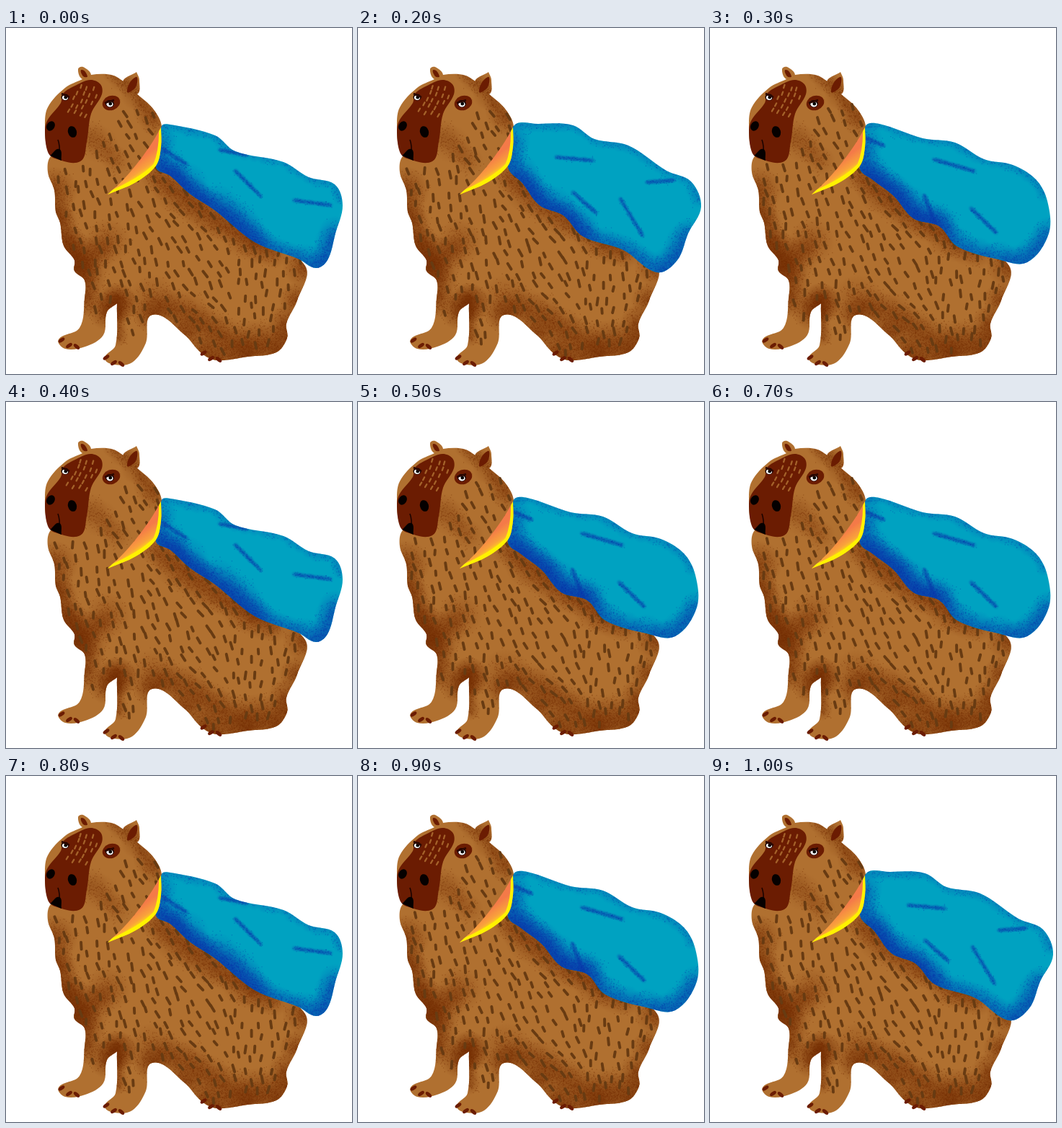
These frames come from a looping animation (480 px wide and 480 px high, 1.1 s). An HTML page with a canvas:

```html
<!DOCTYPE html>
<html lang="en">
<head>
<meta charset="utf-8">
<title>Caped capybara</title>
<style>
html, body { margin: 0; width: 100%; height: 100%; overflow: hidden; background: #fff; }
canvas { display: block; width: 480px; height: 480px; }
</style>
</head>
<body>
<canvas id="stage" width="480" height="480"></canvas>
<script>
const SIZE = 480, STEP = 100;
const BROWN = '#b07030', SHADE = '116,46,3', MASK = '#6b1c02', FUR = '#683b12', BLACK = '#050000';
const TEAL = '#00a2c1', BLUE = '10,56,170', YELLOW = '#fff200';

const points = s => s.split(' ').map(p => p.split(',').map(Number));

function random(seed) {
  return () => {
    seed = (seed + 0x6D2B79F5) | 0;
    let t = Math.imul(seed ^ (seed >>> 15), 1 | seed);
    t = (t + Math.imul(t ^ (t >>> 7), 61 | t)) ^ t;
    return ((t ^ (t >>> 14)) >>> 0) / 4294967296;
  };
}

// Closed smooth curve through key points; a doubled point makes a corner
function blob(text) {
  const pts = points(text), n = pts.length, path = new Path2D();
  const handle = (at, from, to, reach) => {
    const k = reach / (Math.hypot(to[0] - from[0], to[1] - from[1]) || 1);
    return [at[0] + (to[0] - from[0]) * k, at[1] + (to[1] - from[1]) * k];
  };
  path.moveTo(...pts[0]);
  for (let i = 0; i < n; i++) {
    const a = pts[(i + n - 1) % n], b = pts[i], c = pts[(i + 1) % n], d = pts[(i + 2) % n];
    const reach = Math.hypot(c[0] - b[0], c[1] - b[1]) / 3;
    path.bezierCurveTo(...handle(b, a, c, reach), ...handle(c, d, b, reach), ...c);
  }
  return path;
}

function layer(draw) {
  const canvas = document.createElement('canvas');
  canvas.width = canvas.height = SIZE;
  draw(canvas.getContext('2d'));
  return canvas;
}

function oval(g, x, y, rx, ry, turn, color) {
  g.fillStyle = color;
  g.beginPath();
  g.ellipse(x, y, rx, ry, turn, 0, 7);
  g.fill();
}

function dash(g, x, y, angle, length) {
  const dx = Math.sin(angle) * length / 2, dy = Math.cos(angle) * length / 2;
  g.beginPath();
  g.moveTo(x - dx, y - dy);
  g.lineTo(x + dx, y + dy);
  g.stroke();
}

// Soft grainy airbrush spot
function spray(g, x, y, r, rgb, strength, rnd) {
  const soft = g.createRadialGradient(x, y, 0, x, y, r);
  soft.addColorStop(0, `rgba(${rgb},${strength})`);
  soft.addColorStop(0.5, `rgba(${rgb},${strength * 0.45})`);
  soft.addColorStop(1, `rgba(${rgb},0)`);
  g.fillStyle = soft;
  g.fillRect(x - r, y - r, 2 * r, 2 * r);
  g.fillStyle = `rgba(${rgb},0.45)`;
  for (let i = r * r * 0.45 * strength; i > 0; i--) {
    const d = r * 1.15 * Math.sqrt(rnd()) * (0.3 + 0.7 * rnd()), a = rnd() * 6.283;
    g.fillRect(x + d * Math.cos(a), y + d * Math.sin(a), 1.1, 1.1);
  }
}

// Even spray along a chain of points
function sprayLine(g, pts, r, rgb, strength, rnd, gap) {
  for (let i = 1; i < pts.length; i++) {
    const [x, y] = pts[i - 1], dx = pts[i][0] - x, dy = pts[i][1] - y;
    const steps = Math.ceil(Math.hypot(dx, dy) / gap);
    for (let k = 0; k < steps; k++) {
      spray(g, x + dx * k / steps, y + dy * k / steps, r * (0.8 + 0.4 * rnd()), rgb, strength, rnd);
    }
  }
}

const torsoEdge = '216,136 262,195 345,285 415,330 404,378 389,410 390,430 375,450 335,456 292,461 271,451 247,425 203,398 194,437 175,464 150,467 137,458 152,440 154,382 154,382 140,394 135,426 110,442 82,445 73,432 102,416 109,375 109,350 95,337 95,322 80,302 75,270 69,255 67,225 58,200 62,178 120,130';
const torso = blob(torsoEdge);
const head = blob('106,71 118,65 146,65 164,75 181,91 204,112 216,137 208,165 180,200 120,210 72,186 58,170 54,135 58,110 82,83');
const ears = [blob('106,71 100,57 107,54 118,66'), blob('162,76 181,61 181,61 185,72 181,92')];
const body = new Path2D();
[torso, head, ...ears].forEach(p => body.addPath(p));

const mask = blob('98,79 117,72 131,78 133,92 118,119 112,158 103,185 68,181 58,172 54,141 58,127 76,104 79,91');

const bodyLayer = layer(g => {
  const rnd = random(7);
  g.fillStyle = BROWN;
  [...ears, torso, head].forEach(p => g.fill(p));
  g.save();
  g.clip(body);
  const rim = points(torsoEdge).filter(([x, y]) => y > 200 && (y < 410 || x > 200));
  rim.forEach(([x, y]) => spray(g, x, y, 24 + rnd() * 10, SHADE, 0.65, rnd));
  sprayLine(g, points('150,62 182,92 214,140'), 20, SHADE, 0.4, rnd, 16);
  sprayLine(g, points('208,205 290,265 385,318'), 28, SHADE, 0.4, rnd, 18);
  sprayLine(g, points('205,380 255,398 320,445 385,430'), 32, SHADE, 0.38, rnd, 20);
  sprayLine(g, points('84,290 108,330 152,285'), 27, SHADE, 0.4, rnd, 20);
  sprayLine(g, points('118,150 165,195'), 24, SHADE, 0.28, rnd, 18);
  sprayLine(g, points('152,375 156,440'), 16, SHADE, 0.5, rnd, 14);
  g.restore();

  g.fillStyle = MASK;
  g.fill(mask);
  g.fill(blob('180,68 180,82 168,88'));
  g.fill(blob('105,58 113,67 107,67'));
  oval(g, 146, 104, 12.5, 10, -0.35, MASK);

  // Eyes
  for (const [x, y, r] of [[82, 96, 4.5], [144, 105, 5]]) {
    oval(g, x, y, r + 1, r, 0.1, '#160300');
    oval(g, x, y + 0.7, r - 0.4, r - 1.3, 0.1, '#fff');
    oval(g, x + 0.8, y, 2.4, 2.5, 0, '#000');
  }
  g.strokeStyle = '#2b0700';
  g.lineWidth = 2.5;
  g.stroke(new Path2D('M77 91L88 96M137 104L150 100'));

  // Nose and mouth
  oval(g, 62, 136, 5.5, 7, 0.55, BLACK);
  oval(g, 92, 144, 6, 8, -0.3, BLACK);
  g.strokeStyle = '#1c0300';
  g.lineWidth = 1.6;
  g.stroke(new Path2D('M72 155Q75 163 74 174'));
  g.fillStyle = BLACK;
  g.fill(blob('61,177 61,177 74,168 77,184 77,184'));

  for (const [x, y] of points('77,433 139,457 274,451')) {
    for (let i = 0; i < 3; i++) {
      oval(g, x + i * 10.5, y + 4.5 * i + (i === 1 ? 3 : 0), 5, 2.5, i === 2 ? 0.7 : -0.6, MASK);
    }
  }
});

function furLayer(seed, shift) {
  return layer(g => {
    const rnd = random(seed);
    const jitter = size => (rnd() - 0.5) * size;
    const near = (x, y, cx, cy, spread) => Math.exp(-((x - cx) ** 2 + (y - cy) ** 2) / spread);
    const inside = (x, y) => g.isPointInPath(body, x, y);
    g.lineCap = 'round';
    g.strokeStyle = FUR;
    g.lineWidth = 3.9;
    for (let row = 0, top = 116 + shift; top < 456; top += 16, row++) {
      for (let left = 58 + (row % 2) * 9 + shift; left < 412; left += 18) {
        const x = left + jitter(9), y = top + jitter(10);
        // Hair leans back along the spine and belly, stands upright on the rump
        const lean = 0.15 + 0.5 * near(x, y, 255, 255, 6500) + 0.6 * near(x, y, 270, 395, 2200)
          + (y < 200 && x > 140 ? 0.3 : 0) - (x > 310 && y > 310 ? 0.2 : 0) + jitter(0.5);
        const length = 6 + rnd() * 4;
        const face = y < 188 && x < 152 - (y - 125) * 0.6;
        const foot = (x < 146 && y > 405) || (x < 212 && y > 436);
        if (!face && !foot && inside(x - 6, y - 5) && inside(x + 6, y + 7) && inside(x - 4, y + 6)) {
          dash(g, x, y, lean, length);
        }
      }
    }
    // Light hairs on the forehead
    g.strokeStyle = '#a4622a';
    g.lineWidth = 2.3;
    for (let i = 0; i < 20; i++) {
      const row = i >> 2, col = i % 4;
      const x = 104 - row * 4.5 + col * 8.5 + jitter(3), y = 81 + row * 8.5 + col * 2 + jitter(3);
      if (g.isPointInPath(mask, x - 4, y) && g.isPointInPath(mask, x + 4, y + 3)) {
        dash(g, x, y, -0.3 - row * 0.06, 4.5);
      }
    }
  });
}

// Each pose: upper rim, lower rim back to the neck, folds
const capes = {
  A: {
    top: '216,136 228,134 290,149 318,171 385,186 420,207 456,217 467,246',
    low: '457,285 446,322 430,333 405,320 345,297 290,253 255,230 228,205 208,193',
    folds: ['218,168 252,190', '296,169 335,176', '318,198 355,235', '400,239 452,246']
  },
  B: {
    top: '216,136 250,133 298,135 328,154 375,163 428,198 462,213 476,248',
    low: '458,285 443,322 415,339 368,308 312,289 285,260 252,246 228,215 208,193',
    folds: ['275,179 328,184', '364,237 396,290', '298,228 332,258', '400,214 440,211']
  },
  C: {
    top: '216,136 235,133 295,153 340,159 380,182 420,190 452,210 468,240',
    low: '470,285 440,325 400,321 343,303 318,275 282,264 255,233 225,210 208,195',
    folds: ['310,182 368,199', '362,250 398,285', '297,232 313,272', '215,152 243,164']
  }
};

const collar = blob('215,138 215,138 215,165 208,191 180,214 141,231 141,231 164,209 185,184 204,157');

function capeLayer({ top, low, folds }, seed) {
  return layer(g => {
    const rnd = random(seed), shape = blob(`${top} ${low}`);
    const lower = points(low), neck = lower.slice(-5);
    g.fillStyle = TEAL;
    g.fill(shape);
    g.save();
    g.clip(shape);
    sprayLine(g, lower, 23, BLUE, 0.38, rnd, 15);
    sprayLine(g, neck, 32, BLUE, 0.42, rnd, 18);
    sprayLine(g, points('208,190 216,140'), 24, BLUE, 0.4, rnd, 18);
    sprayLine(g, points(top), 11, BLUE, 0.25, rnd, 14);
    folds.forEach(f => sprayLine(g, points(f), 4.5, BLUE, 0.32, rnd, 2));
    g.restore();

    const warm = g.createLinearGradient(178, 186, 192, 206);
    warm.addColorStop(0, '#f47a48');
    warm.addColorStop(0.6, '#f9a23c');
    warm.addColorStop(1, YELLOW);
    g.fillStyle = warm;
    g.fill(collar);
    g.save();
    g.clip(collar);
    g.strokeStyle = YELLOW;
    g.lineWidth = 8;
    g.stroke(new Path2D('M216 138Q217 170 208 191Q188 212 140 232'));
    g.restore();
  });
}

const capeLayers = {};
Object.keys(capes).forEach((key, i) => { capeLayers[key] = capeLayer(capes[key], 31 + i); });
const furLayers = { X: furLayer(11, 0), Y: furLayer(23, 3), Z: furLayer(47, -3) };

const capeOrder = 'ACBCACBCACB', furOrder = 'XZYZYZXZYZY';
const stage = document.getElementById('stage').getContext('2d');
let shown = -1;

function tick() {
  const i = Math.floor(performance.now() / STEP) % capeOrder.length;
  if (i !== shown) {
    shown = i;
    stage.fillStyle = '#fff';
    stage.fillRect(0, 0, SIZE, SIZE);
    [bodyLayer, furLayers[furOrder[i]], capeLayers[capeOrder[i]]].forEach(l => stage.drawImage(l, 0, 0));
  }
  requestAnimationFrame(tick);
}
tick();
</script>
</body>
</html>
```
